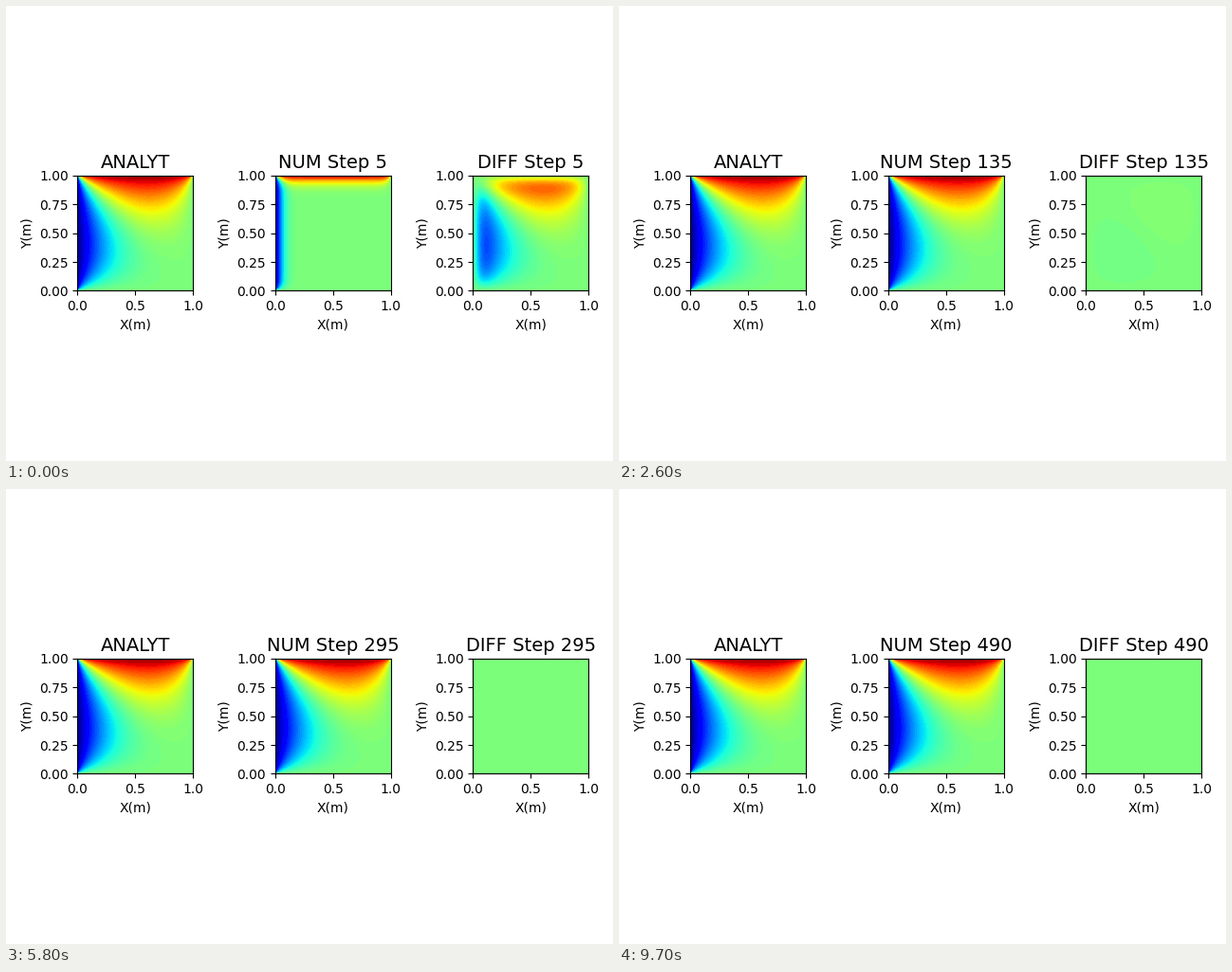
These frames come from a looping animation (640 px wide and 480 px high, 9.8 s). A matplotlib script:

```python
import numpy as np
import matplotlib.pyplot as plt
from matplotlib.animation import FuncAnimation
from matplotlib.colors import ListedColormap

W, H, DPI = 640, 480, 100
FRAMES, INTERVAL = 98, 100
STRIDE = 5            # solver steps between two pictures
NODES = 51
FOURIER, SUBSTEPS = 0.23, 5
LEFT, BOTTOM, SIDE, PITCH = 75.45, 179.55, 121.6, 208.5   # panel layout, px


def start_field():
    """Cold left wall, hot top wall, zero elsewhere."""
    t = np.zeros((NODES, NODES))
    t[1:-1, 0] = -1
    t[-1, 1:-1] = 1
    return t


def advance(t, steps):
    """Explicit diffusion with fixed walls."""
    t = t.copy()
    for _ in range(steps * SUBSTEPS):
        t[1:-1, 1:-1] += FOURIER * (t[2:, 1:-1] + t[:-2, 1:-1] + t[1:-1, 2:]
                                    + t[1:-1, :-2] - 4 * t[1:-1, 1:-1])
    return t


def banded_jet(size=16):
    """Jet with neighbouring shades merged into flat bands."""
    rgb = plt.get_cmap("jet")(np.arange(256))[:, :3]
    keys = np.floor(rgb * 255 / size).astype(int)
    cuts = np.flatnonzero(np.any(np.diff(keys, axis=0), axis=1)) + 1
    bands = [np.tile(b.mean(axis=0), (len(b), 1)) for b in np.split(rgb, cuts)]
    return ListedColormap(np.vstack(bands))


fields = [advance(start_field(), STRIDE)]
for _ in range(FRAMES - 1):
    fields.append(advance(fields[-1], STRIDE))
steady = advance(fields[-1], 500)

plt.rcParams["font.family"] = "DejaVu Sans"
fig = plt.figure(figsize=(W / DPI, H / DPI), dpi=DPI, facecolor="white")
cmap = banded_jet()
half = 0.5 / (NODES - 1)


def add_panel(col, data):
    ax = fig.add_axes([(LEFT + col * PITCH) / W, BOTTOM / H, SIDE / W, SIDE / H])
    img = ax.imshow(data, cmap=cmap, vmin=-1, vmax=1, origin="lower",
                    extent=(-half, 1 + half, -half, 1 + half),
                    interpolation="bilinear", aspect="auto")
    ax.set(xlim=(0, 1), ylim=(0, 1), xlabel="X(m)", ylabel="Y(m)")
    ax.set_xticks([0, 0.5, 1])
    ax.set_yticks([0, 0.25, 0.5, 0.75, 1])
    return ax, img


exact_ax, _ = add_panel(0, steady)
exact_ax.set_title("ANALYT", fontsize=14)
num_ax, num_img = add_panel(1, fields[0])
diff_ax, diff_img = add_panel(2, steady - fields[0])


def update(i):
    step = STRIDE * (i + 1)
    num_img.set_data(fields[i])
    diff_img.set_data(steady - fields[i])
    num_ax.set_title(f"NUM Step {step}", fontsize=14)
    diff_ax.set_title(f"DIFF Step {step}", fontsize=14)
    return num_img, diff_img


anim = FuncAnimation(fig, update, frames=FRAMES, interval=INTERVAL,
                     repeat=True, repeat_delay=0)
plt.show()
```
